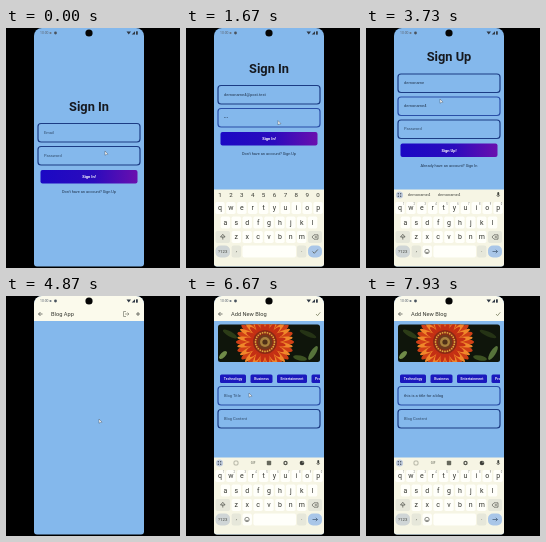
Recreate the animation shown at these times as an HTML page with a canvas. Size 174 by 240 pixels, loop 8 s.

```html
<!DOCTYPE html>
<html lang="en">
<head>
<meta charset="utf-8">
<title>Blog app demo</title>
<style>
  html, body { margin: 0; width: 100%; height: 100%; overflow: hidden; background: #000; }
  canvas { display: block; width: 100vw; height: 100vh; }
</style>
</head>
<body>
<canvas></canvas>
<script>
const LOOP = 8000, W = 174, H = 240;
const LEFT = 28, RIGHT = 138, MID = 83;
const SKY = '#84b8ec', CREAM = '#fbfaec', INK = '#16191f', KEY = '#fffffa';
const canvas = document.querySelector('canvas');
const c = canvas.getContext('2d');

const clamp = v => Math.max(0, Math.min(1, v));
const ramp = (t, start, length) => 1 - (1 - clamp((t - start) / length)) ** 3;
const typed = (text, t, start, end) =>
  text.slice(0, Math.ceil(text.length * clamp((t - start) / (end - start))));

function box(x, y, w, h, r, fill, stroke, line = 1) {
  c.beginPath();
  c.roundRect(x, y, w, h, r);
  if (fill) { c.fillStyle = fill; c.fill(); }
  if (stroke) { c.strokeStyle = stroke; c.lineWidth = line; c.stroke(); }
}

function oval(x, y, rx, ry, turn, fill) {
  c.beginPath();
  c.ellipse(x, y, rx, ry, turn, 0, Math.PI * 2);
  c.fillStyle = fill;
  c.fill();
}

const dot = (x, y, r, fill) => oval(x, y, r, r, 0, fill);

function line(points, color = '#55574e', width = 0.8) {
  c.beginPath();
  points.forEach(([x, y]) => c.lineTo(x, y));
  c.strokeStyle = color;
  c.lineWidth = width;
  c.stroke();
}

function label(text, x, y, size, color = INK, align = 'center', weight = 400) {
  c.font = `${weight} ${size}px Roboto, sans-serif`;
  c.textAlign = align;
  c.textBaseline = 'middle';
  c.fillStyle = color;
  c.fillText(text, x, y);
}

function statusBar() {
  label('10:00', 34, 5, 3.4, '#5c6672', 'left');
  dot(44.5, 5, 1.1, '#6b7682');
  dot(49.5, 5, 1.4, '#48525e');
  dot(MID, 5, 3.6, '#050505');
  c.fillStyle = '#303945';
  c.beginPath();
  c.moveTo(120.5, 3.6); c.lineTo(125, 3.6); c.lineTo(122.75, 6.6);
  c.moveTo(129, 3.2); c.lineTo(129, 6.6); c.lineTo(125.7, 6.6);
  c.fill();
  box(130, 3.2, 1.8, 3.5, 0.4, '#303945');
}

function field(y, hint, value, focused, t) {
  box(32, y, 102, 18.5, 3, null, focused ? '#2a4fa8' : '#1c3c84', 1.2);
  label(value || hint, 38, y + 9.3, 4, value ? '#20324a' : '#304a68', 'left');
  if (focused && t % 1000 < 600) {
    const x = 38.4 + (value ? c.measureText(value).width : 0);
    line([[x, y + 6.5], [x, y + 12.5]], '#3038a8', 0.5);
  }
}

function authScreen(form, lift, t) {
  const top = form.top - 38 * lift;
  label(form.title, MID, top, 12.8, INK, 'center', 700);
  form.fields.forEach(([hint, value], i) =>
    field(top + 16.5 + 23 * i, hint, value, i === form.focus, t));
  const y = top + 17 + 23 * form.fields.length;
  const shade = c.createLinearGradient(34, 0, 132, 0);
  shade.addColorStop(0, '#1b08c4');
  shade.addColorStop(0.55, '#2b0bbd');
  shade.addColorStop(1, '#6b0fae');
  box(34.5, y, 97, 13.5, 2, shade);
  label(form.button, MID, y + 7, 4, '#fff', 'center', 700);
  label(form.link, MID, y + 22, 3.9, '#1d3048');
}

function appBar(title) {
  c.fillStyle = CREAM;
  c.fillRect(LEFT, 0, RIGHT - LEFT, 25);
  label(title, 45, 18, 5.7, '#34362f', 'left');
  line([[36.5, 18], [32.5, 18]]);
  line([[34.5, 16], [32.5, 18], [34.5, 20]]);
}

function homeScreen() {
  appBar('Blog App');
  line([[120, 15.5], [117.5, 15.5], [117.5, 20.5], [120, 20.5]], '#8a8c7e');
  line([[119, 18], [123, 18]], '#8a8c7e');
  line([[121.5, 16.5], [123, 18], [121.5, 19.5]], '#8a8c7e');
  line([[130, 18], [134, 18]]);
  line([[132, 16], [132, 20]]);
}

function petals(count, reach, width, color, turn) {
  for (let i = 0; i < count; i++) {
    const a = (i + turn) / count * Math.PI * 2;
    oval(79 + reach / 2 * Math.cos(a), 46 + reach / 2 * Math.sin(a), reach / 2, width, a, color);
  }
}

function flower() {
  c.save();
  c.beginPath();
  c.roundRect(32, 28.5, 102, 37.5, 2.5);
  c.clip();
  c.fillStyle = '#0f150b';
  c.fillRect(32, 28, 102, 39);
  oval(37, 59, 5, 2.4, -0.8, '#6f8a48');
  oval(44, 38, 8, 2.5, 0.5, '#2c3c17');
  oval(114, 62, 7, 2.5, 0.2, '#3d5222');
  oval(127, 57, 8, 2.6, -1, '#57733a');
  oval(122, 38, 9, 2.4, 0.4, '#253315');
  petals(20, 29, 3.6, '#cf3f16', 0);
  petals(20, 28, 2.6, '#f0872a', 0.5);
  petals(20, 21, 2.5, '#c42f14', 0.5);
  dot(79, 46, 12, '#8c2a15');
  for (let i = 0; i < 24; i++) {
    const a = i * Math.PI / 12;
    dot(79 + 9.5 * Math.cos(a), 46 + 9.5 * Math.sin(a), 0.9, '#d9a63a');
  }
  dot(79, 46, 7.5, '#6e3a1c');
  dot(79, 46, 5, '#a8813c');
  dot(79, 46, 2.6, '#4f3018');
  c.restore();
}

function blogScreen(t) {
  appBar('Add New Blog');
  line([[130, 18], [131.5, 19.7], [134.3, 16.3]], '#7d8060');
  if (t >= 5900) flower();
  c.save();
  c.beginPath();
  c.rect(31, 76, 103, 14);
  c.clip();
  [['Technology', 34, 26], ['Business', 64.5, 22], ['Entertainment', 91, 30], ['Programming', 125.5, 29]]
    .forEach(([name, x, w]) => {
      box(x, 78.5, w, 8.5, 1.5, '#1a18bd');
      label(name, x + w / 2, 83, 3.6, '#fff', 'center', 500);
    });
  c.restore();
  field(90.5, 'Blog Title', typed('this is a title for a blog', t, 6800, 7900), t > 6350, t);
  field(113.5, 'Blog Content', '', false, t);
}

function keyRow(letters, x, y, hints) {
  [...letters].forEach((letter, i) => {
    const mid = x + i * 10.9;
    box(mid - 4.7, y - 6, 9.4, 12, 1.8, KEY);
    label(letter, mid, y, 7, '#34362f');
    if (hints) label((i + 1) % 10, mid + 3.4, y - 4, 2.6, '#74766c');
  });
}

function toolIcons() {
  box(48, 165, 4, 4, 1, null, '#8a8c7e', 0.6);
  label('GIF', 67, 167, 3, '#8a8c7e', 'center', 700);
  box(80.8, 164.8, 4.4, 4.4, 0.8, '#66685c');
  dot(99.5, 167, 2.2, '#55574e');
  dot(99.5, 167, 0.9, CREAM);
  dot(116, 167, 2.3, '#3f413a');
  dot(117, 166, 0.6, CREAM);
}

function keyboard(rise, mode, words) {
  if (rise <= 0) return;
  c.save();
  c.translate(0, 79 * (1 - rise));
  c.fillStyle = '#f6f5e4';
  c.fillRect(LEFT, 161.5, RIGHT - LEFT, 80);
  if (mode === 'digits') {
    [...'1234567890'].forEach((n, i) => label(n, 34 + i * 10.9, 167.5, 6.2, '#34362f'));
  } else {
    dot(33.5, 167, 3.6, '#c3cede');
    [[32.3, 165.8], [34.7, 165.8], [32.3, 168.2], [34.7, 168.2]]
      .forEach(([x, y]) => dot(x, y, 0.7, '#44505f'));
    if (mode === 'tools') toolIcons();
    else words.forEach((word, i) => label(word, 53 + i * 30, 167, 4, '#44463f'));
    box(131.3, 164, 1.9, 3.6, 1, '#44463f');
    line([[130.5, 167], [132.2, 169], [134, 167]], '#44463f', 0.6);
  }
  keyRow('qwertyuiop', 34, 180, mode !== 'digits');
  keyRow('asdfghjkl', 39.4, 194.5);
  keyRow('zxcvbnm', 50.3, 209);
  box(29.5, 203, 14.5, 12, 2, '#e6e7da');
  box(122, 203, 14, 12, 2, '#e6e7da');
  line([[36.8, 211.5], [36.8, 209], [34.5, 209], [36.8, 206.3], [39.1, 209], [36.8, 209]], '#44463f', 0.7);
  line([[126, 209], [128, 206.8], [132, 206.8], [132, 211.2], [128, 211.2], [126, 209]], '#44463f', 0.6);
  line([[128.7, 207.9], [130.9, 210.1]], '#44463f', 0.5);
  line([[130.9, 207.9], [128.7, 210.1]], '#44463f', 0.5);
  box(29.5, 217.5, 14.5, 12, 5, '#cfd5d6');
  label('?123', 36.7, 223.7, 4.3, '#44463f');
  box(45.6, 217.5, 9.4, 12, 2, '#e6e7da');
  label(',', 50.3, 222.5, 6, '#55574e');
  const start = mode === 'digits' ? 56.5 : 67.4;
  if (mode !== 'digits') {
    box(56.5, 217.5, 9.4, 12, 2, KEY);
    c.beginPath();
    c.arc(61, 223.5, 2.2, 0, Math.PI * 2);
    c.strokeStyle = '#44463f';
    c.lineWidth = 0.6;
    c.stroke();
    c.beginPath();
    c.arc(61, 223.7, 1.1, 0, Math.PI);
    c.stroke();
  }
  box(start, 217.5, 110 - start, 12, 2, KEY);
  box(111, 217.5, 9.4, 12, 2, '#e6e7da');
  label('.', 115.7, 222.5, 6, '#55574e');
  box(122, 217.5, 14, 12, 5, '#a9c6e8');
  if (mode === 'digits') line([[126.5, 223.5], [128.3, 225.3], [131.8, 221.5]]);
  else {
    line([[126.5, 223.5], [131.5, 223.5]], '#4a617c');
    line([[129.8, 221.8], [131.5, 223.5], [129.8, 225.2]], '#4a617c');
  }
  c.restore();
}

// Pointer stops: time, x, y
const stops = [
  [0, 100, 125], [300, 80, 105], [1150, 80, 68], [1400, 93, 92], [1750, 93, 95],
  [2050, 102, 126], [2400, 92, 120], [2800, 74, 99], [2950, 75, 56], [3350, 75, 56],
  [3480, 75, 73], [3950, 75, 73], [4100, 78, 101], [4500, 94, 122], [4870, 94, 125],
  [5200, 132, 18], [5550, 84, 47], [5950, 84, 47], [6300, 64, 99], [6800, 64, 99]
];

function pointer(t) {
  const i = stops.findIndex(stop => stop[0] > t);
  if (i < 1) return;
  const [t0, x0, y0] = stops[i - 1], [t1, x1, y1] = stops[i];
  const k = (t - t0) / (t1 - t0), e = k * k * (3 - 2 * k);
  c.save();
  c.translate(x0 + (x1 - x0) * e, y0 + (y1 - y0) * e);
  c.beginPath();
  [[-1, -2], [-1, 2.3], [0.1, 1.4], [2, 1.2]].forEach(([x, y]) => c.lineTo(x, y));
  c.closePath();
  c.fillStyle = '#fff';
  c.strokeStyle = '#38424f';
  c.lineWidth = 0.4;
  c.fill();
  c.stroke();
  c.restore();
}

function signIn(t) {
  return {
    title: 'Sign In', button: 'Sign In!', link: "Don't have an account? Sign Up", top: 79,
    focus: t < 330 ? -1 : t < 1400 ? 0 : 1,
    fields: [
      ['Email', typed('demoname4@post.test', t, 600, 1250)],
      ['Password', typed('••••••', t, 1520, 1880)]
    ]
  };
}

function signUp(t) {
  return {
    title: 'Sign Up', button: 'Sign Up!', link: 'Already have an account? Sign In', top: 67.5,
    focus: t < 2950 ? -1 : t < 3480 ? 0 : t < 4100 ? 1 : 2,
    fields: [
      ['Name', typed('demoname', t, 3000, 3330)],
      ['Email', typed('demoname4@post.test', t, 3500, 4000)],
      ['Password', typed('••••••', t, 4150, 4400)]
    ]
  };
}

function draw(t) {
  const scale = devicePixelRatio || 1;
  const w = Math.round(innerWidth * scale), h = Math.round(innerHeight * scale);
  if (canvas.width !== w || canvas.height !== h) { canvas.width = w; canvas.height = h; }
  c.setTransform(w / W, 0, 0, h / H, 0, 0);
  c.fillStyle = '#000';
  c.fillRect(0, 0, W, H);
  c.save();
  c.beginPath();
  c.roundRect(LEFT, 0, RIGHT - LEFT, 238.5, [8, 8, 3, 3]);
  c.clip();
  c.fillStyle = SKY;
  c.fillRect(LEFT, 0, RIGHT - LEFT, H);

  let rise = 0, mode = 'words', words = ['well', 'and', 'nothing'];
  if (t < 2200) {
    rise = ramp(t, 350, 230) - ramp(t, 2000, 200);
    if (t >= 1400) mode = 'digits';
    authScreen(signIn(t), rise, t);
  } else if (t < 4700) {
    rise = ramp(t, 2350, 230) - ramp(t, 4480, 200);
    if (t >= 4100) mode = 'digits';
    else if (t >= 3300) words = ['demoname4', 'demoname4', ''];
    authScreen(signUp(t), rise, t);
  } else if (t < 5250) {
    homeScreen();
  } else {
    rise = ramp(t, 6350, 230);
    mode = 'tools';
    blogScreen(t);
  }
  keyboard(rise, mode, words);
  statusBar();
  pointer(t);
  c.restore();
}

const begin = performance.now();
function tick() {
  draw((performance.now() - begin) % LOOP);
  requestAnimationFrame(tick);
}
tick();
</script>
</body>
</html>
```
